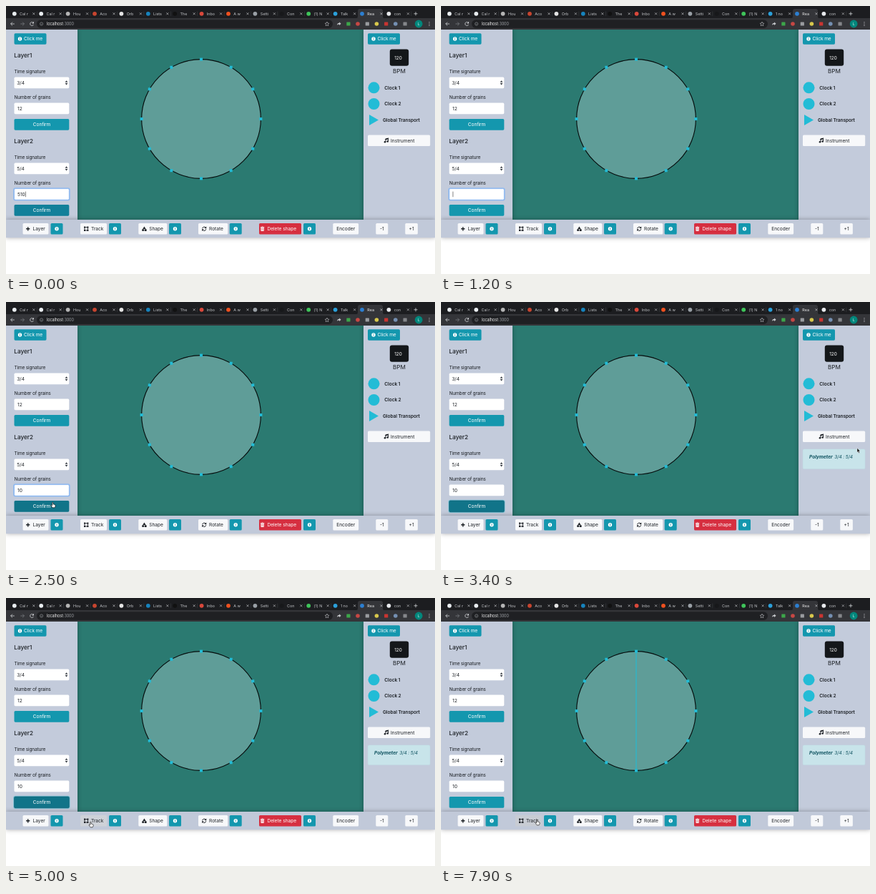
Recreate the animation shown at these times as an HTML page. Size 600 by 375 pixels, loop 8000 ms.

```html
<!DOCTYPE html>
<html lang="en">
<head>
<meta charset="utf-8">
<title>Polymeter editor</title>
<style>
html, body { margin: 0; width: 100%; height: 100%; overflow: hidden; background: #fff; }
svg { display: block; width: 600px; height: 375px; }
text { font-family: Inter, Roboto, "Liberation Sans", sans-serif; font-size: 6.6px; fill: #1d2126; white-space: pre; }
.panel { filter: drop-shadow(0 0 3px rgba(0, 0, 0, .32)); }
</style>
</head>
<body>
<svg id="stage" viewBox="0 0 600 375" xmlns="http://www.w3.org/2000/svg"></svg>
<script>
const LOOP = 8000;
const TEAL = '#1497ae', DARK_TEAL = '#117489', CYAN = '#22bcd6', PANEL = '#c3cbdb', LIGHT = '#f7f8fa', INK = '#1d2126';

const rect = (x, y, w, h, fill, r = 0, more = '') =>
  `<rect x="${x}" y="${y}" width="${w}" height="${h}" rx="${r}" fill="${fill}" ${more}/>`;
const circle = (x, y, r, fill, more = '') =>
  `<circle cx="${x}" cy="${y}" r="${r}" fill="${fill}" ${more}/>`;
const path = (d, fill, more = '') => `<path d="${d}" fill="${fill}" ${more}/>`;
const line = (d, color, w, more = '') =>
  path(d, 'none', `stroke="${color}" stroke-width="${w}" ${more}`);
const text = (x, y, s, style = '', more = '') =>
  `<text x="${x}" y="${y}" style="${style}" ${more}>${s}</text>`;
const mid = 'text-anchor="middle"';
const at = (x, y, body) => `<g transform="translate(${x} ${y})">${body}</g>`;

const icons = {
  plus: line('M-2.6 0H2.6M0 -2.6V2.6', INK, 1.4),
  square: line('M-2.2 -2.2H2.2V2.2H-2.2Z', INK, .9) +
    [[-2.2, -2.2], [2.2, -2.2], [-2.2, 2.2], [2.2, 2.2]]
      .map(([x, y]) => rect(x - 1, y - 1, 2, 2, INK, .3)).join(''),
  shapes: path('M0 -3.3L2.2 .1H-2.2Z', INK) + circle(-1.8, 1.8, 1.5, INK) + rect(.4, .5, 2.8, 2.7, INK, .3),
  sync: line('M-2.6 -.5A2.7 2.7 0 0 1 2 -1.8M2.6 .5A2.7 2.7 0 0 1 -2 1.8', INK, 1) +
    path('M3.1 -3.3V-.5H.3ZM-3.1 3.3V.5H-.3Z', INK),
  trash: path('M-2.7 -2.8H-1L-.6 -3.4H.6L1 -2.8H2.7V-2H-2.7ZM-2.3 -1.5H2.3L2 3.2H-2Z', '#fff') +
    line('M-.8 -.8V2.4M.8 -.8V2.4', '#d62f40', .5),
  note: line('M-1.1 2V-2L2.6 -3V1.2', INK, .9) + path('M-1.5 -2.4L3 -3.6V-2L-1.5 -.8Z', INK) +
    circle(-2, 2.1, 1.3, INK) + circle(1.7, 1.3, 1.3, INK)
};
const info = (x, y) => circle(x, y, 2.7, '#fff') +
  rect(x - .45, y - .5, .9, 2, TEAL) + circle(x, y - 1.4, .5, TEAL);

function button(x, w, icon, label, labelX, fill = LIGHT, color = INK, id = '') {
  const box = rect(x, 304, w, 15.5, fill, 1.6, id && `id="${id}"`);
  return box + (icon ? at(labelX - 6.8, 311.8, icons[icon]) : '') +
    (icon ? text(labelX, 314.2, label, `fill:${color}`) : text(x + w / 2, 314.2, label, '', mid));
}
const infoButton = x => rect(x, 304, 17, 15.5, TEAL, 1.6) + info(x + 8.5, 311.7);
const clickMe = x => rect(x, 38.3, 45, 15.4, TEAL, 1.6) + info(x + 8, 46) +
  text(x + 13.5, 48.4, 'Click me', 'fill:#fff;letter-spacing:-.1px');

function layer(n, y, beat, grains) {
  const label = 'letter-spacing:-.2px';
  const two = n === 2;
  return text(11.3, y + 71.6, 'Layer' + n, 'font-size:8.2px;font-weight:500') +
    text(11.5, y + 93.6, 'Time signature', label) +
    rect(11.5, y + 99.6, 76.8, 15.6, '#fff', 1.6) +
    text(15.3, y + 109.8, beat) +
    path(`M82.6 ${y + 106.7}l1.9 -2.4 1.9 2.4ZM82.6 ${y + 108.1}l1.9 2.4 1.9 -2.4Z`, '#343a40') +
    text(11.5, y + 129.6, 'Number of grains', label) +
    (two ? rect(10.9, y + 135, 78, 16.8, 'none', 2.2, 'id="glow" stroke="#7fb2f5" stroke-opacity=".7" stroke-width="1.6"') : '') +
    rect(11.5, y + 135.6, 76.8, 15.6, '#fff', 1.6, two ? 'id="field"' : '') +
    text(16, y + 145.8, grains, '', two ? 'id="grains"' : '') +
    (two ? rect(16.5, y + 139.6, .55, 7.6, '#222', 0, 'id="caret"') : '') +
    (two ? rect(10.9, y + 157.4, 78, 16.9, 'none', 2.2, 'id="ring" stroke="#7fc3d6" stroke-width="1.5"') : '') +
    rect(11.5, y + 158, 76.8, 15.7, TEAL, 1.6, two ? 'id="confirm"' : '') +
    text(50, y + 168.3, 'Confirm', 'fill:#fff;letter-spacing:-.1px', mid);
}

function browser() {
  const tabs = [
    ['Cal r', '#e9edf0'], ['Cal r', '#e9edf0'], ['Hou', '#b5b5b5'], ['Aco', '#c8452f'], ['Orb', '#e4e4e4'],
    ['Lists', '#1683bd'], ['The', '#111'], ['Inbo', '#d9483b'], ['A w', '#f0511f'], ['Setti', '#9aa0a6'],
    ['Con', '#17181a'], ['(1) N', '#3fc55a'], ['Talk', '#2ba0da'], ['Rea', '#2c7fd1'], ['con', '#e8eaed']
  ];
  let out = rect(0, 0, 600, 17.5, '#1c1d20') + rect(0, 17, 600, 16, '#343539') +
    path('M489 17.5Q492 17.5 492 14V7Q492 4 495 4H524Q527 4 527 7V14Q527 17.5 530 17.5Z', '#343539');
  tabs.forEach(([name, color], i) => {
    const x = 11.8 + i * 37.4;
    out += circle(x, 10.8, 2.9, color) +
      `<svg x="${x + 6.5}" y="4" width="15.5" height="13">` +
      text(.8, 8.8, name, `font-size:5.4px;fill:${i === 13 ? '#f1f1f1' : '#c3c5c8'}`, i === 12 ? 'id="alert"' : '') +
      '</svg>' +
      line(`M${x + 25.5} 9.3l3 3m0 -3l-3 3`, '#c6c8cb', .65);
    if (i !== 12 && i !== 13) out += rect(x + 31.3, 7.5, .4, 6.5, '#4b4d51');
  });
  out += line('M570.5 10.8h5M573 8.3v5', '#d5d7da', .8);
  out += line('M11.8 25H6.6m2.4 -2.4L6.6 25l2.4 2.4', '#d5d7da', .8) +
    line('M20.3 25h5.2m-2.4 -2.4l2.4 2.4 -2.4 2.4', '#797b80', .8) +
    line('M38.4 23.8A2.5 2.5 0 1 0 38.5 26', '#d5d7da', .8) + path('M38.9 21.8V24.5H36.2Z', '#d5d7da') +
    rect(43, 19.2, 414, 11.7, '#1f2023', 5.8) +
    circle(49.6, 25, 2.1, 'none', 'stroke="#a9acb0" stroke-width=".55"') + rect(49.35, 24.7, .5, 1.4, '#a9acb0') +
    text(57, 27, 'localhost<tspan fill="#9a9da2">:3000</tspan>', 'font-size:5.5px;fill:#f0f0f0;letter-spacing:-.07px') +
    line('M449 22.2l.85 1.8 2 .3 -1.4 1.4 .3 2 -1.75 -.95 -1.75 .95 .3 -2 -1.4 -1.4 2 -.3Z', '#d5d7da', .55);
  out += path('M463 26.8Q463.4 23.8 466 23.8V22.4L468.6 24.8 466 27V25.4Q464.2 25.4 463 26.8Z', '#c9cbce');
  ['#3da64a', '#c74744', '#9a9ca0', '#d8c84c', '#c93531', '#7590b3', '#85878b'].forEach((color, i) => {
    out += i % 2 ? circle(492 + (i - 1) * 13.2, 25, 2.8, color) : rect(476.3 + i * 13.2, 22.4, 5.2, 5.2, color, .5);
  });
  out += circle(577.2, 25, 5.4, '#00877c') + text(577.2, 27, 'L', 'font-size:5.4px;fill:#e6f4f2', mid);
  [22.8, 25, 27.2].forEach(y => { out += circle(592, y, .6, '#d5d7da'); });
  return out;
}

function canvas() {
  const cx = 273, cy = 158, r = 83.4;
  let out = rect(100, 33, 400, 266, '#2b7a71') + circle(cx, cy, r, '#5f9d98', 'stroke="#050b0b" stroke-width="1.1"') +
    line(`M${cx} ${cy - r}V${cy + r}`, CYAN, 1.1, 'id="track"');
  for (let i = 0; i < 12; i++) {
    const a = i * Math.PI / 6;
    out += rect(cx + r * Math.cos(a) - 2, cy + r * Math.sin(a) - 2, 4, 4, CYAN);
  }
  return out;
}

function rightPanel() {
  const strong = 'font-weight:600;letter-spacing:-.09px';
  return rect(500, 33, 100, 266, PANEL, 0, 'class="panel"') + clickMe(506) +
    rect(536.8, 60.6, 26.4, 23.2, '#14171a', 3) + text(548.5, 74.7, '120', 'fill:#fff;font-size:6.4px', mid) +
    text(550, 94.4, 'BPM', 'font-size:8.2px', mid) +
    circle(514.5, 114.3, 8, CYAN) + text(529.3, 116.7, 'Clock 1', strong) +
    circle(514.5, 137, 8, CYAN) + text(529.3, 139.3, 'Clock 2', strong) +
    path('M508 152L521 159.5 508 167Z', CYAN) + text(527, 161.9, 'Global Transport', strong) +
    rect(506, 180.4, 87.2, 15.6, LIGHT, 1.6) + at(532, 188.2, icons.note) + text(538, 190.6, 'Instrument') +
    `<g id="ratio">${rect(506.2, 206, 86.8, 27.6, '#c8e4ea', 1.6, 'stroke="#bcdde5" stroke-width=".5"')}` +
    text(515, 219.2, 'Polymeter', 'font-weight:700;font-style:italic;fill:#0f5360;letter-spacing:-.03px') +
    text(550.3, 219.2, '3/4 : 5/4', 'font-style:italic;fill:#0f5360;letter-spacing:-.13px') + '</g>';
}

function bottomBar() {
  return rect(0, 299, 600, 25.2, '#c1c9d9', 0, 'class="panel"') +
    button(23.5, 36, 'plus', 'Layer', 37.5) + infoButton(62.5) +
    button(104, 37, 'square', 'Track', 119, LIGHT, INK, 'trackButton') + infoButton(144) +
    button(185.3, 40, 'shapes', 'Shape', 200.2) + infoButton(228) +
    button(269, 41.2, 'sync', 'Rotate', 284) + infoButton(312.7) +
    button(354, 59, 'trash', 'Delete shape', 365.4, '#d62f40', '#fff') + infoButton(416) +
    button(457.3, 35.8, '', 'Encoder') + button(517.3, 17, '', '-1') + button(558.3, 17.6, '', '+1');
}

const cursors =
  path('M-1.5 -3.6V2.4L-.1 1.2 .9 3.5 2 3 1 .8H2.8Z', '#0b0b0b', 'id="arrow" stroke="#fff" stroke-width=".45"') +
  path('M-1.3 .3V-3Q-1.2 -3.8 -.6 -3.8 0 -3.8 0 -3V-.9Q.7 -1.3 1.1 -.7 1.8 -1 2.1 -.3 3 -.4 3 .5V1.8Q2.8 3 2.1 3.8H-.9L-2.8 1.2Q-3.2 .4 -2.6 .1 -2 0 -1.3 .9Z',
    '#fff', 'id="hand" stroke="#111" stroke-width=".65" stroke-linejoin="round"');

const stage = document.getElementById('stage');
stage.innerHTML = rect(0, 0, 600, 375, '#fff') + canvas() +
  rect(0, 33, 100, 266, PANEL, 0, 'class="panel"') + clickMe(11.5) +
  layer(1, 0, '3/4', '12') + layer(2, 120, '5/4', '510') +
  rightPanel() + bottomBar() + browser() + `<g id="cursor">${cursors}</g>`;

const el = {};
stage.querySelectorAll('[id]').forEach(node => { el[node.id] = node; });

// Each table is a list of [start ms, value].
const typed = [[0, '510'], [300, '51'], [600, '5'], [1000, ''], [1500, '1'], [1700, '10']];
const caretOn = [[0, true], [2200, false]];
const fieldFocus = [[0, true], [2700, false]];
const confirmFill = [[0, '#12809a'], [1000, TEAL], [2100, DARK_TEAL], [5800, TEAL]];
const confirmFocus = [[0, false], [2700, true], [5800, false]];
const trackFill = [[0, LIGHT], [4700, '#ced2d8'], [5800, '#c8ccd3']];
const ratioOn = [[0, false], [2800, true]];
const trackOn = [[0, false], [7000, true]];
const alertText = [[0, 'Talk'], [500, '1 no'], [1500, 'Talk'], [1800, '1 no'], [2300, 'Talk'],
  [2600, '1 no'], [5100, 'Talk'], [5800, '1 no'], [6300, 'Talk']];
const pointer = [[0, ''], [1900, 'arrow'], [2100, 'hand'], [2900, 'arrow'], [4700, 'hand']];
const route = [[1900, 60, 297], [2400, 66, 284], [2800, 66, 284], [3300, 583.5, 208], [3400, 583.5, 208],
  [3900, 480, 300], [4300, 240, 318], [4900, 119, 317], [7500, 119, 317], [7900, 135, 314]];

const pick = (steps, t) => steps.filter(s => s[0] <= t).pop()[1];

function place(t) {
  const i = route.findIndex(p => p[0] > t);
  if (i === 0) return route[0].slice(1);
  if (i < 0) return route[route.length - 1].slice(1);
  const [t0, x0, y0] = route[i - 1], [t1, x1, y1] = route[i];
  const k = (t - t0) / (t1 - t0), e = k * k * (3 - 2 * k);
  return [x0 + (x1 - x0) * e, y0 + (y1 - y0) * e];
}
const show = (node, on) => node.setAttribute('visibility', on ? 'visible' : 'hidden');

function draw(t) {
  const value = pick(typed, t);
  el.grains.textContent = value;
  el.caret.setAttribute('x', value ? 16.3 + el.grains.getComputedTextLength() : 16.6);
  show(el.caret, pick(caretOn, t));
  show(el.glow, pick(fieldFocus, t));
  el.field.setAttribute('stroke', pick(fieldFocus, t) ? '#6aa5ee' : 'none');
  el.field.setAttribute('stroke-width', .6);

  const focus = pick(confirmFocus, t);
  show(el.ring, focus);
  el.confirm.setAttribute('fill', pick(confirmFill, t));
  el.confirm.setAttribute('stroke', focus ? '#0d6074' : 'none');
  el.confirm.setAttribute('stroke-width', .7);

  el.trackButton.setAttribute('fill', pick(trackFill, t));
  show(el.ratio, pick(ratioOn, t));
  show(el.track, pick(trackOn, t));
  el.alert.textContent = pick(alertText, t);

  const kind = pick(pointer, t);
  show(el.arrow, kind === 'arrow');
  show(el.hand, kind === 'hand');
  el.cursor.setAttribute('transform', `translate(${place(t).join(' ')})`);
}

function tick() {
  draw(Math.floor(performance.now() % LOOP / 100) * 100);
  requestAnimationFrame(tick);
}
tick();
</script>
</body>
</html>
```
